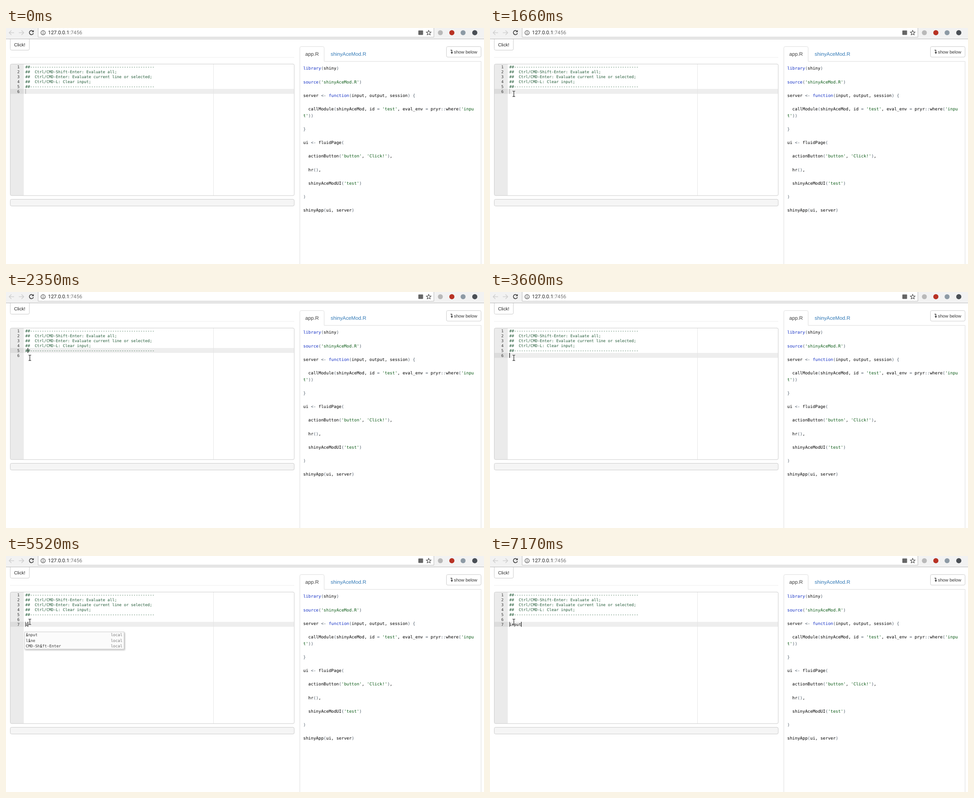
These frames come from a looping animation (1063 px wide and 527 px high, 8 s). An HTML page:

```html
<!DOCTYPE html>
<html lang="en">
<head>
<meta charset="utf-8">
<title>Shiny editor module</title>
<style>
  html, body { margin: 0; width: 100%; height: 100%; overflow: hidden; background: #fff; }
  svg, pre { position: absolute; text-rendering: geometricPrecision; }
  svg { left: 0; top: 0; display: block; }
  text { white-space: pre; }
  .mono { font: 8.69px "DejaVu Sans Mono", monospace; fill: #111; }
  .ui { font-family: "Liberation Sans", sans-serif; }
  .url { font: 11.4px Roboto, sans-serif; fill: #222; }
  .comment { fill: #1c5632; }
  .item { fill: #333; }
  .meta { fill: #777; text-anchor: end; }
  .num { fill: #333; text-anchor: end; }
  .hit { font-weight: bold; fill: #111; }
  .box { stroke: #ccc; }
  .icon { fill: none; stroke: #444; stroke-width: 1.5; }
  pre { left: 661px; top: 83.4px; margin: 0; color: #000;
        font: 9.42px/15.08px "DejaVu Sans Mono", monospace; }
  .key { color: #1430c4; }
  .str { color: #0b5a16; }
  .op { color: #4f5c6a; }
</style>
</head>
<body>
<svg width="1063" height="527" viewBox="0 0 1063 527">
  <defs>
    <filter id="shadow" x="-10%" y="-30%" width="120%" height="190%">
      <feDropShadow dx="1.5" dy="2" stdDeviation="1.6" flood-opacity=".28"/>
    </filter>
    <path id="beam" d="M-3 -6H-1Q0 -6 0 -5Q0 -6 1 -6H3M0 -5V5M-3 6H-1Q0 6 0 5Q0 6 1 6H3"/>
  </defs>

  <!-- browser bar -->
  <rect width="1063" height="24" fill="#f2f2f2"/>
  <path d="M71.5 -1V20.5H951.5V-1" fill="#fff" stroke="#bdbdbd"/>
  <path d="M0 24.5H1063" stroke="#b8b8b8"/>
  <g class="icon">
    <path d="M18 10.5H7.5M12 5.5L7 10.5L12 15.5M28.5 10.5H39M34.5 5.5L39.5 10.5L34.5 15.5" stroke="#cfcfcf"/>
    <path d="M60 7.2A4.6 4.6 0 1 0 61 11.5" stroke-width="1.7"/>
    <path d="M61.8 4.5V9.3H57Z" fill="#444" stroke="none"/>
    <circle cx="82.5" cy="10.5" r="4.7" stroke-width="1.2"/>
    <path d="M82.5 9.8V13.3M82.5 7.5V8.8" stroke-width="1.3"/>
    <path d="M940 5.3L941.5 8.9L945.3 9.2L942.4 11.7L943.3 15.4L940 13.4L936.7 15.4L937.6 11.7L934.7 9.2L938.5 8.9Z" stroke-width="1.1"/>
  </g>
  <rect x="917" y="5.5" width="10.5" height="10" rx="1" fill="#666"/>
  <circle cx="966" cy="10.5" r="5.5" fill="#b9b9b9"/>
  <circle cx="991.5" cy="10.5" r="5.7" fill="#b83224"/>
  <circle cx="1016.5" cy="10.5" r="5.5" fill="#8d9aa5"/>
  <circle cx="1042.5" cy="10.5" r="5.7" fill="#4a4f55"/>
  <text class="url" x="93.5" y="14.3">127.0.0.1<tspan fill="#777">:7456</tspan></text>

  <!-- left column -->
  <path class="box" d="M9.5 25V46.5Q9.5 49.5 12.5 49.5H49Q52 49.5 52 46.5V25" fill="#fff"/>
  <text class="ui" x="18" y="41.2" font-size="10.2" fill="#222">Click!</text>
  <path d="M9 65.5H641" stroke="#eee"/>
  <rect x="10" y="81" width="29.5" height="293" fill="#ebebeb"/>
  <g id="active">
    <rect x="10" width="29.5" height="11" fill="#dcdcdc"/>
    <rect x="39.5" width="601" height="11" fill="#eee"/>
  </g>
  <path d="M461.5 81V374" stroke="#e6e6e6"/>
  <rect class="box" x="9.5" y="80.5" width="631.5" height="293.7" rx="3" fill="none"/>
  <rect class="box" x="9.5" y="382.5" width="631.5" height="15" rx="3" fill="#f5f5f5"/>
  <g id="lines" class="mono"></g>
  <rect id="ghost" x="43" width="1" height="11" fill="#444"/>
  <rect id="caret" width="1.2" height="11"/>

  <!-- right column -->
  <path d="M653.5 527V44.5Q653.5 41.5 656.5 41.5H704.5Q707.5 41.5 707.5 44.5V74.5H1056.5V527" fill="none" stroke="#ddd"/>
  <rect class="box" x="979.5" y="41.5" width="77" height="23.5" rx="3" fill="#fff"/>
  <path d="M988.5 49.5H991.5V55" class="icon"/>
  <path d="M988.8 54.2H994.2L991.5 57.8Z" fill="#333"/>
  <g class="ui">
    <text x="665.5" y="62" font-size="11.3" fill="#444">app.R</text>
    <text x="722" y="62" font-size="11.3" fill="#337ab7">shinyAceMod.R</text>
    <text x="996" y="56.5" font-size="9.95" fill="#333">show below</text>
  </g>

  <!-- completion list -->
  <g id="popup">
    <rect x="41.5" y="169.5" width="221" fill="#fbfbfb" stroke="#ccc" filter="url(#shadow)"/>
    <g class="mono"></g>
  </g>

  <g id="pointer" fill="none">
    <use href="#beam" stroke="#fff" stroke-width="2.4"/>
    <use href="#beam" stroke="#111" stroke-width="1.1"/>
  </g>
</svg>
<pre id="code"></pre>

<script>
const LOOP = 8000, CHAR = 5.23, ROW = 11.06, LEFT = 43;
const $ = id => document.getElementById(id);
const rule = '##' + '-'.repeat(53);
const comments = [
  rule,
  '##  Ctrl/CMD-Shift-Enter: Evaluate all;',
  '##  Ctrl/CMD-Enter: Evaluate current line or selected;',
  '##  Ctrl/CMD-L: Clear input;',
  rule
];
const words = ['input', 'line', 'CMD-Shift-Enter'];

const code = `library(shiny)

source('shinyAceMod.R')

server <- function(input, output, session) {

  callModule(shinyAceMod, id = 'test', eval_env = pryr::where('inpu
t'))

}

ui <- fluidPage(

  actionButton('button', 'Click!'),

  hr(),

  shinyAceModUI('test')

)

shinyApp(ui, server)`;

const tokens = /('[^']*')|\b(library|source|function)\b|(<-|::|[=(){}])/g;
$('code').innerHTML = code.replace(tokens, (all, str, key) =>
  `<span class="${str ? 'str' : key ? 'key' : 'op'}">${all.replace('<', '&lt;')}</span>`);

// Each state adds to the one before it.
const states = [
  { at: 0, rows: 6, line: 6, col: 0, typed: '', caret: '#aaa', list: false, ghost: false },
  { at: 1740, line: 5, col: 1, caret: '#111' },
  { at: 3600, line: 6, col: 0 },
  { at: 4440, rows: 7, line: 7 },
  { at: 5520, typed: 'i', col: 1, list: true, ghost: true },
  { at: 5680, typed: 'in', col: 2 },
  { at: 6310, caret: 'none' },
  { at: 6690, typed: 'inp', col: 3, caret: '#111' },
  { at: 6840, typed: 'inpu', col: 4 },
  { at: 7170, typed: 'input', col: 5, list: false }
];
states.reduce((before, s) => Object.assign(s, { ...before, ...s }));

const label = (x, y, content, cls = '') => `<text x="${x}" y="${y}" class="${cls}">${content}</text>`;

// Marks the typed letters in order; null when the word does not hold them all.
function match(word, typed) {
  let n = 0;
  const out = [...word].map(c =>
    c.toLowerCase() === typed[n] ? (n++, `<tspan class="hit">${c}</tspan>`) : c).join('');
  return n === typed.length ? out : null;
}

function show(s) {
  const top = Math.round(81 + (s.line - 1) * ROW);
  $('active').setAttribute('transform', `translate(0 ${top})`);
  $('caret').setAttribute('x', Math.round(LEFT + s.col * CHAR));
  $('caret').setAttribute('y', top);
  $('caret').setAttribute('fill', s.caret);
  $('ghost').setAttribute('y', top);
  $('ghost').style.display = s.ghost ? '' : 'none';

  let rows = '';
  for (let i = 0; i < s.rows; i++) {
    const y = 90 + i * ROW;
    rows += label(30.3, y, i + 1, 'num');
    if (comments[i]) rows += label(LEFT, y, comments[i], 'comment');
  }
  $('lines').innerHTML = rows + label(LEFT, 90 + 6 * ROW, s.typed);

  const found = words.map(w => match(w, s.typed)).filter(Boolean);
  const [frame, items] = $('popup').children;
  $('popup').style.display = s.list ? '' : 'none';
  frame.setAttribute('height', found.length * 12.6 + 0.5);
  items.innerHTML = found.map((w, i) => {
    const y = 179.2 + i * 12.6;
    return label(44, y, w, 'item') + label(259, y, 'local', 'meta');
  }).join('');
}

const mix = (a, b, k) => a + (b - a) * k;
const stepped = (t, from, to, n) => Math.min(n, Math.max(0, Math.floor((t - from) / (to - from) * n + 0.01))) / n;

function movePointer(t) {
  const k = stepped(t, 500, 1280, 10), sweep = k * k * (3 - 2 * k);
  const settle = stepped(t, 1270, 1660, 5);
  const x = mix(mix(698, 75, sweep), 53, settle);
  const y = mix(mix(462, 167.5, sweep), 147, settle);
  $('pointer').style.display = t < 500 ? 'none' : '';
  $('pointer').setAttribute('transform', `translate(${Math.round(x)} ${Math.round(y)})`);
}

const start = performance.now();
let current;
function tick() {
  const t = (performance.now() - start) % LOOP;
  const state = states.filter(s => s.at <= t).pop();
  if (state !== current) show(current = state);
  movePointer(t);
  requestAnimationFrame(tick);
}
tick();
</script>
</body>
</html>
```
